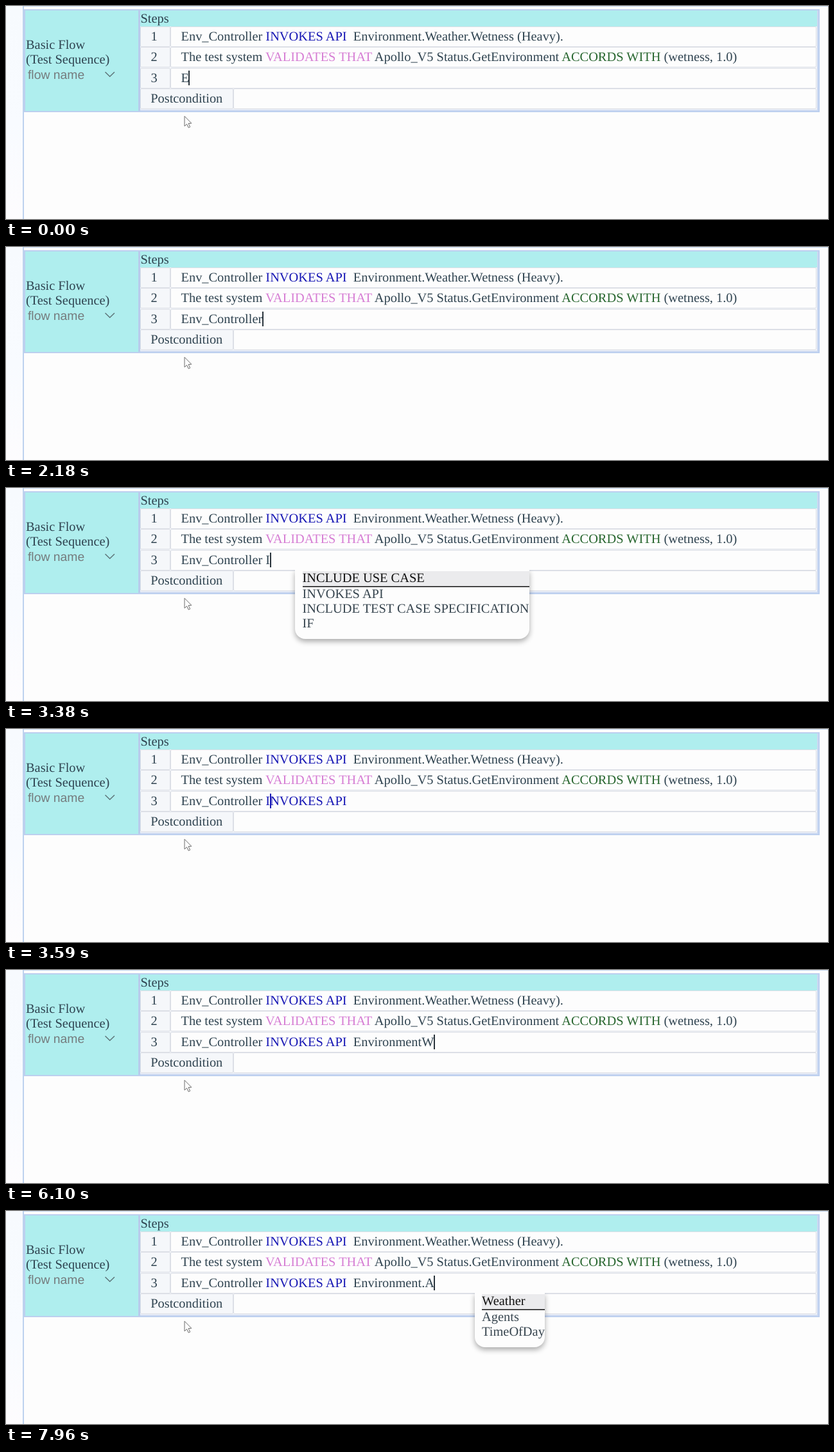
An HTML page for the animation above (8000 ms loop, 1280 px wide and 333 px high).

```html
<!DOCTYPE html>
<html lang="en">
<head>
<meta charset="utf-8">
<title>Step editor</title>
<style>
html, body { margin: 0; width: 100%; height: 100%; overflow: hidden; }
body { background: #fdfdfd; }
#stage {
  position: relative; width: 1280px; height: 333px; overflow: hidden;
  font: 20.39px/24px "Liberation Serif", "Times New Roman", serif;
  color: #2f4350; text-rendering: geometricPrecision; white-space: pre;
}
#stage > * { position: absolute; }
.margin { left: 0; top: 0; width: 26px; height: 333px; background: linear-gradient(#f7fafe, #f8fbff 55%, #fdfcfe); }
.top { left: 27px; top: 0; width: 1253px; height: 1px; background: #c6d8f0; }
.side { left: 26px; top: 0; width: 2px; height: 333px; background: #bdd2ee; }
.table { left: 28px; top: 5px; width: 1235px; height: 157px; border: 2px solid #bccfef; background: #afeeee; }
.split { left: 206px; top: 7px; width: 3px; height: 157px; background: #b9cbec; }
.body { left: 209px; top: 32px; width: 1054px; height: 130px; background: #f3f5f9; border-bottom: 2px solid #d3def2; }
.edge { left: 1263px; top: 7px; width: 2px; height: 157px; background: #cbd8f1; }
.cell { box-sizing: border-box; height: 32px; border: 1px solid #dcdfe6; border-radius: 2px; background: #fdfdfd; }
.cell.label { background: #f5f7fa; }
.blue { color: #1616b4; }
.violet { color: #d67dd4; }
.green { color: #28662f; }
.flow { font: 19.35px/24px "Liberation Sans", Arial, sans-serif; color: #757b7d; }
#ghost { visibility: hidden; }
#caret { position: absolute; top: 0; width: 2px; height: 23px; margin-left: -.6px; background: #2a343c; }
#caret.blue { background: #1616b4; }
#popup {
  top: 128px; padding: 2.3px 0 11.4px 11.5px; line-height: 23.3px;
  background: #fdfdfd; border-radius: 0 0 16px 16px; box-shadow: 0 4px 8px rgba(0, 0, 0, .33);
  color: #37454f; clip-path: inset(0 -12px -16px);
}
#popup .on { color: #111; background: #ebebed; padding-bottom: 1.3px; box-shadow: inset 0 -1.5px #111; }
</style>
</head>
<body>
<div id="stage">
  <div class="margin"></div><div class="top"></div><div class="side"></div>
  <div class="table"></div><div class="split"></div><div class="body"></div><div class="edge"></div>
</div>
<script>
const stage = document.getElementById('stage');

function add(cls, x, y, html = '', id = '') {
  const el = document.createElement('div');
  el.className = cls;
  el.id = id;
  el.style.left = x + 'px';
  el.style.top = y + 'px';
  el.innerHTML = html;
  stage.append(el);
  return el;
}
// y is the middle of the text line
const text = (x, y, html, cls = '', id = '') => add(cls, x, y - 12, html, id);
const cell = (x, y, w, cls) => { add('cell ' + cls, x, y).style.width = w + 'px'; };

const rowY = i => 47.6 + 32.5 * i;
for (let i = 0; i < 4; i++) {
  const y = Math.round(rowY(i) - 16), w = i < 3 ? 47 : 145;
  cell(209, y, w, 'label');
  cell(209 + w, y, 1053 - w, '');
  if (i < 3) text(225.5, rowY(i), i + 1);
}
text(225.2, rowY(3), 'Postcondition');
text(209.5, 20.3, 'Steps');
text(31, 60.8, 'Basic Flow');
text(31, 84.2, '(Test Sequence)');
text(34, 107.7, 'flow name', 'flow');

const key = '<span class="blue">INVOKES API</span>';
text(272.5, rowY(0), `Env_Controller ${key}  Environment.Weather.Wetness (Heavy).`);
text(272.5, rowY(1), 'The test system <span class="violet">VALIDATES THAT</span> ' +
  'Apollo_V5 Status.GetEnvironment <span class="green">ACCORDS WITH</span> (wetness, 1.0)');
const line = text(272.5, rowY(2), '');
text(272.5, rowY(2), '<span id="ghost"></span><span id="caret"></span>');
const ghost = document.getElementById('ghost');
const caret = document.getElementById('caret');

add('', 0, 0, `<svg width="1280" height="333" style="display:block" fill="none">
  <path d="M154.5 103.2l7.2 7 7.2-7" stroke="#5d7478" stroke-width="1.5"/>
  <path d="M278 172.3v15.6l3.6-3.3 2.6 5.6 2.5-1.1-2.6-5.5 4.7-.3z" fill="#fdfdfd" stroke="#6c6c6c"/>
</svg>`);
const popup = add('', 0, 128, '', 'popup');

const menus = {
  e: ['ELSE', 'ELSEIF', 'ENDIF', 'ENDDO', 'EXTENDED BY USE CASE'],
  i: ['INCLUDE USE CASE', 'INVOKES API', 'INCLUDE TEST CASE SPECIFICATION', 'IF'],
  n: ['Environment'],
  dot: ['Weather', 'Agents', 'TimeOfDay']
};

// Each state: time, text, caret column (-1 hides it), menu, selected item
const states = [];
const at = (t, str, col = str.length, menu = '', sel = -1) => states.push({ t, str, col, menu, sel });
const name = 'Env_Controller', call = name + ' INVOKES API', env = call + '  Environment';

at(0, 'E');
at(420, 'E', 1, 'e');
at(530, 'En', 2, 'e');
at(650, 'En');
at(760, 'Env');
at(980, 'Env_');
for (let i = 0; i < 8; i++) at(1290 + 113 * i, name.slice(0, 5 + i));
at(2180, name);
at(2410, name + ' ');
at(2630, name + ' I');
at(2730, name + ' I', 16, 'i');
at(2950, name + ' I', -1, 'i');
at(3180, name + ' I', 16, 'i', 0);
at(3390, name + ' I', 16, 'i', 1);
at(3490, call, 16);
at(3830, call, -1);
at(3940, call);
at(4260, call + ' ');
at(4380, call + '  ');
at(4590, call + '  E');
at(4820, call + '  En');
at(4930, call + '  En', 30, 'n');
at(5140, call + '  En', -1, 'n');
at(5240, call + '  En', 30, 'n', 0);
at(5350, env, 30);
at(5560, env);
at(6100, env + 'W');
at(6420, env);
at(6860, env + '.');
at(7090, env + '.', 40, 'dot');
at(7190, env + '.', 40, 'dot', 0);
at(7400, env + '.', -1, 'dot', 0);
at(7640, env + '.', 40, 'dot', 0);
at(7860, env + '.A', 41, 'dot', 0);

function show({ str, col, menu, sel }) {
  line.innerHTML = str.replace('INVOKES API', key);
  ghost.textContent = str.slice(0, Math.max(col, 0));
  caret.style.display = col < 0 ? 'none' : 'block';
  caret.style.left = ghost.getBoundingClientRect().width + 'px';
  caret.className = str === call && col < str.length ? 'blue' : '';
  popup.style.display = menu ? 'block' : 'none';
  if (!menu) return;
  // The menu drifts right by a fixed step for each typed character
  const typed = menu === 'dot' ? 40 : str.length;
  popup.style.left = 263.6 + 11.65 * typed + 'px';
  popup.innerHTML = menus[menu].map((s, i) => `<div class="${i === sel ? 'on' : ''}">${s}</div>`).join('');
}

let current;
function tick() {
  const t = performance.now() % 8000;
  const next = states.findLast(s => s.t <= t);
  if (next !== current) show(current = next);
  requestAnimationFrame(tick);
}
tick();
</script>
</body>
</html>
```
